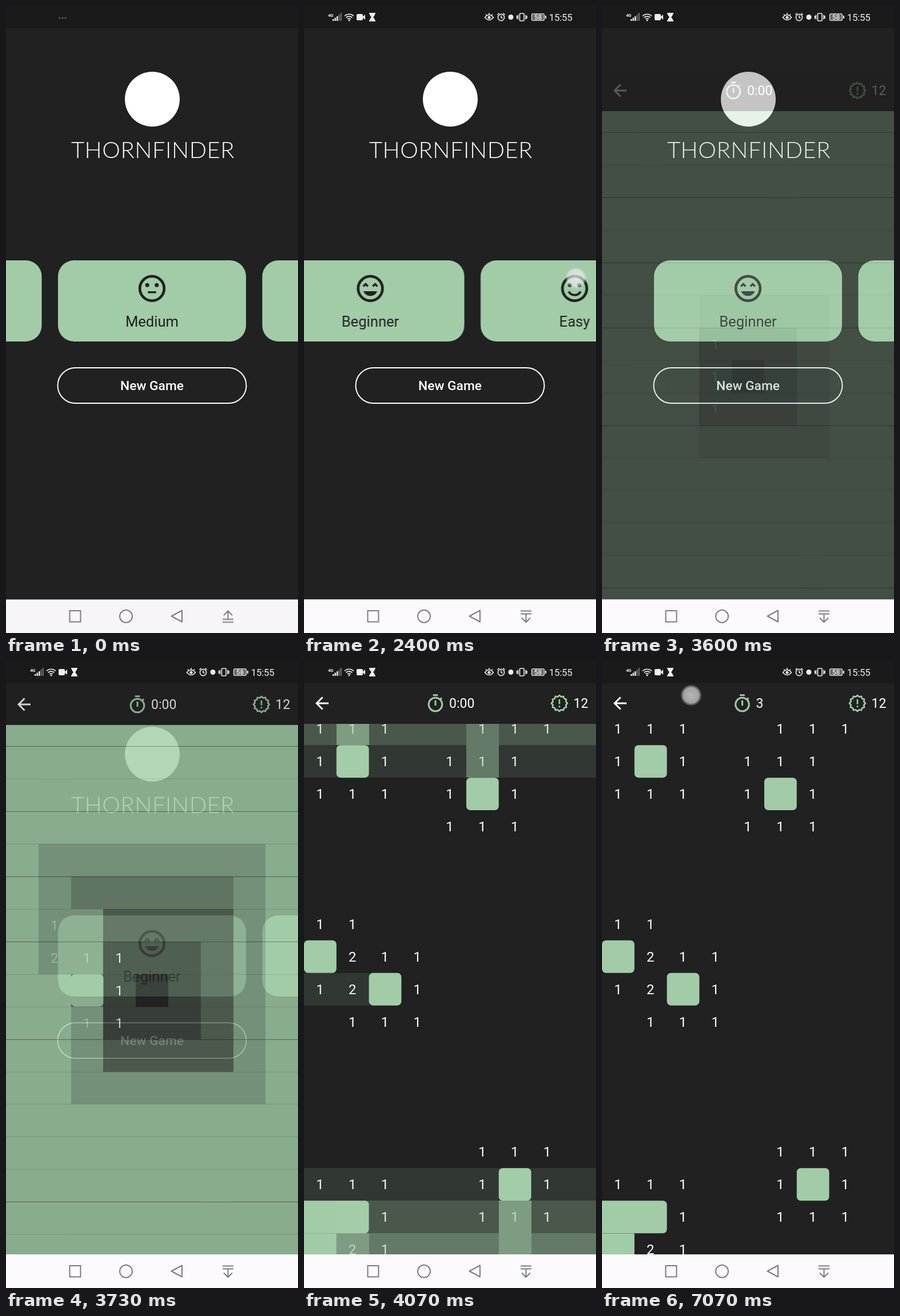
Write an HTML page that moves like this. It is 511x1097 px and loops after 7.14 s.

```html
<!DOCTYPE html>
<html lang="en">
<head>
<meta charset="utf-8">
<title>Tile game</title>
<style>
  :root { --loop: 7140ms; --bg: #212121; --green: #a2cca8; }
  html, body { margin: 0; width: 100%; height: 100%; overflow: hidden; background: var(--bg); }
  svg { display: block; font-family: Roboto, sans-serif; }
  #stage { position: absolute; left: 0; top: 0; }
  .line { fill: none; stroke: currentColor; }
  .num { font-size: 24px; fill: #fff; text-anchor: middle; }
  .bar { font-size: 23px; fill: #fff; }
  .label { font-size: 25.6px; text-anchor: middle; }
  .green { color: var(--green); }

  .anim, .cover { animation: var(--loop) linear infinite both; }
  .step { animation-timing-function: step-end; }
  .early { animation-name: early; }
  .late { animation-name: late; }
  .icons { animation-name: icons; }
  .deck { animation-name: swipe; }
  .ripple { animation-name: ripple; }
  .rise { animation-name: rise; }
  .fade { animation-name: fade; }
  .idle { animation-name: idle; }
  .run { animation-name: run; }
  .digits { animation-name: digits; }
  .press { animation-name: press; }
  .touch { animation-name: touch; }
  .cover { animation-name: open; animation-delay: calc(var(--level) * 53ms); shape-rendering: crispEdges; }

  @keyframes early { 0% { opacity: 1 } .98%, 100% { opacity: 0 } }
  @keyframes late { 0% { opacity: 0 } .98%, 100% { opacity: 1 } }
  @keyframes icons { 0%, .7% { opacity: 0 } 2.8%, 100% { opacity: 1 } }
  @keyframes swipe {
    0%, 17.787% { transform: translateX(-715px) }
    18.627% { transform: translateX(-622px) }
    19.608% { transform: translateX(-498px) }
    20.588% { transform: translateX(-430px) }
    21.429% { transform: translateX(-395px) }
    22.409% { transform: translateX(-372px) }
    23.81% { transform: translateX(-360px) }
    27.03%, 31.793% { transform: translateX(-357.5px) }
    32.633% { transform: translateX(-265px) }
    33.613% { transform: translateX(-140.5px) }
    34.594% { transform: translateX(-72px) }
    35.434% { transform: translateX(-37px) }
    36.415% { transform: translateX(-15px) }
    37.815% { transform: translateX(-3px) }
    41.036%, 100% { transform: none }
  }
  @keyframes press {
    0%, 20.588%, 34.594%, 49.44% { opacity: 0 }
    17.787%, 31.793%, 47.619%, 99.02%, 100% { opacity: 1 }
  }
  @keyframes touch {
    0%, 17.787% { transform: translate(257px, 490px) }
    18.627% { transform: translate(352px, 485px) }
    19.608% { transform: translate(475px, 476px) }
    20.588% { transform: translate(520px, 470px) }
    31.793% { transform: translate(257px, 490px) }
    32.633% { transform: translate(352px, 485px) }
    33.613% { transform: translate(475px, 476px) }
    34.594% { transform: translate(520px, 470px) }
    47.619%, 49.44% { transform: translate(290px, 660px) }
    99%, 100% { transform: translate(156px, 60px) }
  }
  @keyframes ripple {
    0%, 47.61% { transform: scale(0); opacity: 1 }
    47.62% { transform: scale(.4) }
    48.6% { transform: scale(1); opacity: 1 }
    52%, 100% { transform: scale(3); opacity: 0 }
  }
  @keyframes rise {
    0%, 48.543% { transform: translateY(250px); animation-timing-function: cubic-bezier(.4, 0, .2, 1) }
    52.745%, 100% { transform: none }
  }
  @keyframes fade {
    0%, 48.543% { opacity: 0; animation-timing-function: ease-in }
    52.745%, 100% { opacity: 1 }
  }
  @keyframes open { 0%, 48.557% { opacity: 1 } 52.283%, 100% { opacity: 0 } }
  @keyframes idle { 0% { opacity: 1 } 62.605%, 100% { opacity: 0 } }
  @keyframes run { 0% { opacity: 0 } 62.605%, 100% { opacity: 1 } }
  @keyframes digits {
    0% { transform: none }
    76.611% { transform: translateY(-30px) }
    90.616%, 100% { transform: translateY(-60px) }
  }
</style>
</head>
<body>
<svg id="stage" width="511" height="1097" viewBox="0 0 511 1097">
  <defs>
    <clipPath id="pill"><rect x="90.5" y="633" width="330" height="62" rx="31"/></clipPath>
    <radialGradient id="glow">
      <stop offset="0" stop-color="#f4f4f4" stop-opacity=".72"/>
      <stop offset=".72" stop-color="#eee" stop-opacity=".62"/>
      <stop offset=".84" stop-color="#fff" stop-opacity=".3"/>
      <stop offset="1" stop-color="#fff" stop-opacity="0"/>
    </radialGradient>
    <rect id="card" x="91" y="445" width="329" height="142" rx="28" fill="#a2cca8"/>
    <circle id="face" class="line" r="9" stroke-width="2"/>
    <g id="eyes"><circle cx="-3.5" cy="-2.5" r="1.5"/><circle cx="3.5" cy="-2.5" r="1.5"/></g>
    <g id="watch" class="line green" stroke-width="3">
      <circle cy="2" r="11.8"/>
      <path d="M-4.3-14.3H4.3M0-5V4M8.3-6.8 11-9.5"/>
    </g>
    <path id="arrow" d="M379 1058.5h19M379 1063.5h19M388.500 1063.500v14M381 1070.500l7.500 7.500 7.500-7.500"/>
  </defs>

  <rect width="511" height="1097" fill="#212121"/>

  <!-- menu -->
  <circle cx="256" cy="163" r="48" fill="#fff"/>
  <text x="257" y="265.500" text-anchor="middle" fill="#fff"
    style="font: 300 40px Lato, sans-serif; letter-spacing: .5px">THORNFINDER</text>
  <g class="anim deck" fill="#212121" color="#212121">
    <g>
      <use href="#card"/>
      <g transform="translate(255.500 494.300) scale(2.37)">
        <use href="#face"/>
        <path class="line" stroke-width="1.5" d="M-5.200-1.600l1.700-1.700 1.700 1.700M1.800-1.600l1.700-1.700 1.700 1.700"/>
        <path d="M-5.100 2H5.100A5.500 5.500 0 0 1-5.100 2z"/>
      </g>
      <text class="label" x="255.500" y="561">Beginner</text>
    </g>
    <g transform="translate(357.500)">
      <use href="#card"/>
      <g transform="translate(255.500 494.300) scale(2.37)">
        <use href="#face"/><use href="#eyes"/>
        <path class="line" stroke-width="1.6" d="M-4.400 2.200A5 5 0 0 0 4.400 2.200"/>
      </g>
      <text class="label" x="255.500" y="561">Easy</text>
    </g>
    <g transform="translate(715)">
      <use href="#card"/>
      <g transform="translate(255.500 494.300) scale(2.37)">
        <use href="#face"/><use href="#eyes"/>
        <rect x="-3" y="2" width="6" height="1.500"/>
      </g>
      <text class="label" x="255.500" y="561">Medium</text>
    </g>
    <use href="#card" x="1072.500"/>
  </g>
  <g clip-path="url(#pill)">
    <g transform="translate(290 662)"><circle class="anim ripple" r="52" fill="#20282d"/></g>
  </g>
  <rect class="line" x="90.500" y="633" width="330" height="62" rx="31" color="#fff" stroke-width="2"/>
  <text x="255.500" y="672" text-anchor="middle" fill="#fff" font-size="22.800" font-weight="500">New Game</text>

  <!-- game -->
  <g class="anim fade"><g class="anim rise">
    <rect y="39" width="511" height="1058" fill="#212121"/>
    <g id="board"></g>
    <rect y="39" width="511" height="71" fill="#212121"/>
    <path class="line" color="#fff" stroke-width="2.900" d="M43 74H22M32.500 63.500 22 74l10.500 10.500"/>
    <g class="anim step idle">
      <use href="#watch" x="230" y="74"/>
      <text class="bar" x="254" y="82">0:00</text>
    </g>
    <g class="anim step run">
      <use href="#watch" x="245.500" y="74"/>
      <svg x="269.500" y="62" width="20" height="24">
        <g class="bar anim step digits">
          <text y="20">1</text><text y="50">2</text><text y="80">3</text>
        </g>
      </svg>
    </g>
    <g class="line green" transform="translate(447 74)" stroke-width="2.600">
      <polygon id="badge" stroke-linejoin="round"/>
      <path d="M0-7V1.500M0 4.200V7"/>
    </g>
    <text class="bar" x="471.500" y="82">12</text>
  </g></g>

  <!-- status bar -->
  <rect width="511" height="39" fill="#1a1a1a"/>
  <g class="anim step early" fill="#666">
    <circle cx="94" cy="21" r="1.500"/><circle cx="99" cy="21" r="1.500"/><circle cx="104" cy="21" r="1.500"/>
  </g>
  <g class="anim icons" fill="#eee" color="#eee">
    <text x="42" y="18.500" font-size="8" font-weight="700" letter-spacing="-.5">4G</text>
    <path d="M50 23h2.400v3H50zM53.500 20.500h2.400v5.500h-2.400zM57 18h2.400v8H57z"/>
    <path fill="#666" d="M60.300 15h2.400v11h-2.400zM63.600 12h2.400v14h-2.400z"/>
    <path class="line" stroke-width="1.700" d="M71 17.500a11.500 11.500 0 0 1 16 0M73.600 20.300a7.800 7.800 0 0 1 10.800 0M76.200 23a4 4 0 0 1 5.600 0"/>
    <circle cx="79" cy="25" r="1.500"/>
    <rect x="92" y="14" width="11" height="11" rx="2"/><path d="M102 19.500 107 15v9z"/>
    <path d="M114 12h11v2h-1c0 3-2 4-3 5.500 1 1.500 3 2.500 3 5.500h1v2h-11v-2h1c0-3 2-4 3-5.500-1-1.500-3-2.500-3-5.500h-1z"/>
    <g class="line" stroke-width="1.600">
      <path d="M316.500 20q7.500-9 15 0-7.500 9-15 0zM318 14.500l2 2M324 12v3M330 14.500l-2 2"/>
      <circle cx="345" cy="20" r="5.600"/>
      <path d="M345 16.500V20l2.500 1.500M338.500 15.500l3-3M351.500 15.500l-3-3"/>
      <rect x="377.500" y="13" width="7.500" height="13" rx="1"/>
      <path d="M374.500 15.500v8M388 15.500v8M372 17l1 2.500-1 2.500M390.500 17l-1 2.500 1 2.500"/>
      <rect x="398.500" y="13.500" width="22" height="12" rx="2.500" stroke-width="1.200" fill="#666"/>
    </g>
    <circle cx="324" cy="20" r="2.600"/>
    <circle cx="362" cy="19.500" r="4.500"/>
    <rect x="422" y="17" width="2" height="5"/>
    <text x="409.500" y="24" font-size="12" font-weight="500" text-anchor="middle">58</text>
    <text x="428.700" y="25.500" font-size="17" letter-spacing="-.3">15:55</text>
  </g>

  <!-- navigation bar -->
  <rect y="1038.400" width="511" height="59" fill="#f7f5f9"/>
  <rect class="anim step late" y="1038.400" width="511" height="59" fill="#fcfafd"/>
  <g class="line" color="#7c7c7f" stroke-width="2">
    <rect x="111.500" y="1058" width="19" height="19.500"/>
    <circle cx="210" cy="1067.800" r="11"/>
    <path d="M289.500 1067.500 308 1057.500v20z" stroke-linejoin="round"/>
    <g class="anim step early"><use href="#arrow" transform="matrix(1 0 0 -1 0 2136.500)"/></g>
    <g class="anim step late"><use href="#arrow"/></g>
  </g>

  <g class="anim step press"><circle class="anim touch" r="19" fill="url(#glow)"/></g>
</svg>
<script>
  const W = 56.8, H = 56.93, TOP = 90.3, COLS = 9, GREEN = '#a2cca8';
  // '#': closed tile, '<': closed pair running off the left edge, '=': square closed tile
  const rows = [
    '111  111', '1#1 111', '111 1#1', '    111', '', '', '11', '#211', '12#1',
    ' 111', '', '', '', '     111', '111  1#1', ' <1  111', '=21'
  ];
  const seams = [1, 3, 5, 7, 10, 15];
  // cells reached late because a closed tile blocks the way
  const blocked = {
    '0,8': 7, '1,8': 7, '5,0': 9, '5,1': 9, '1,0': 10,
    '6,15': 10, '6,16': 10, '1,16': 10
  };
  const board = document.getElementById('board');

  function add(tag, attrs, text) {
    const el = document.createElementNS('http://www.w3.org/2000/svg', tag);
    for (const key in attrs) el.setAttribute(key, attrs[key]);
    if (text) el.textContent = text;
    board.append(el);
    return el;
  }

  function addCover(level, attrs) {
    add('rect', { class: 'cover', ...attrs }).style.setProperty('--level', level);
  }

  // Order in which the opening spreads from the middle cell
  function level(col, row) {
    const dx = col - 4, dy = row - 8;
    const key = col + ',' + row;
    if (key in blocked) return blocked[key];
    let side = [0, 1, 2, 4, 5][Math.abs(dx)];
    if (dx === -2 && dy > -3 && dy !== 0) side = 4;
    if (dx === -3 && dy > 0) side = 5;
    return Math.max(side, dy > 2 ? dy + 1 : Math.abs(dy));
  }

  rows.forEach((line, row) => {
    const y = TOP + row * H, top = Math.round(y);
    for (let col = 0; col < COLS; col++) {
      const x = col * W, left = Math.round(x), mark = line[col] || ' ';
      if (mark === '#') add('rect', { x, y, width: W, height: H, rx: 7, fill: GREEN });
      else if (mark === '<') add('rect', { x: -20, y, width: 20 + 2 * W, height: H, rx: 7, fill: GREEN });
      else if (mark === '=') add('rect', { x: -20, y: y + .3, width: 20 + W, height: H, fill: GREEN });
      else if (mark !== ' ') add('text', { class: 'num', x: x + W / 2 - .5, y: y + 37 }, mark);
      addCover(level(col, row), {
        x: left, y: top, fill: GREEN,
        width: Math.round(x + W) - left, height: Math.round(y + H) - top
      });
    }
  });

  // hairlines between rows, gone once the board has opened
  rows.forEach((line, row) => addCover(5, {
    y: Math.round(TOP + row * H), width: 511, height: 1,
    'fill-opacity': seams.includes(row) ? .4 : .1
  }));

  const points = Array.from({ length: 24 }, (_, i) => {
    const a = i * Math.PI / 12, r = i % 2 ? 11.6 : 14;
    return [r * Math.sin(a), -r * Math.cos(a)].map(v => v.toFixed(2));
  });
  document.getElementById('badge').setAttribute('points', points.join(' '));
</script>
</body>
</html>
```
